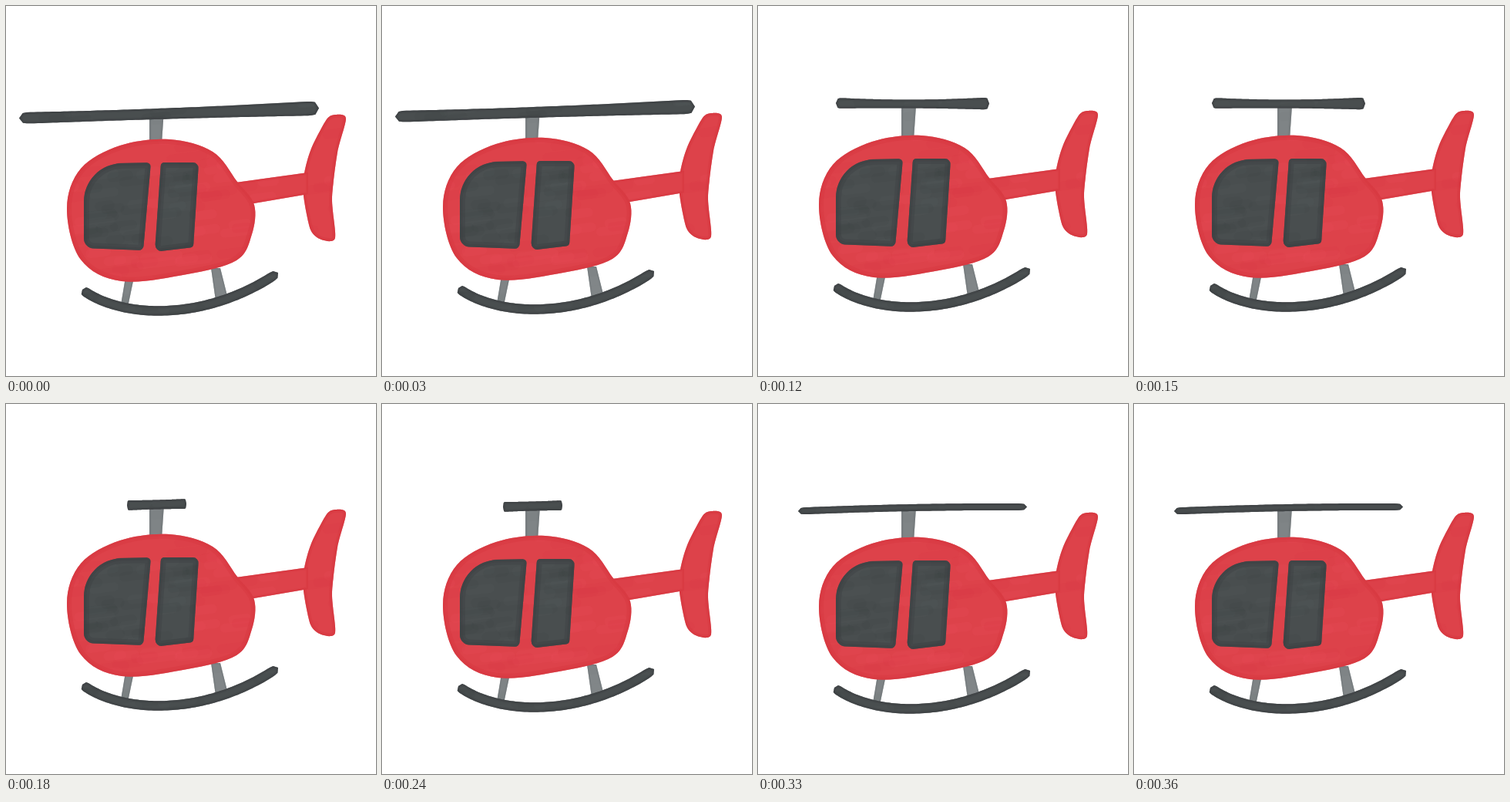
These frames come from a looping animation (480 by 480 pixels, 390 ms). An HTML page with a canvas:

```html
<!DOCTYPE html>
<html lang="en">
<head>
<meta charset="utf-8">
<title>Helicopter</title>
<style>
html, body { margin: 0; width: 100%; height: 100%; overflow: hidden; background: #fff; }
canvas { display: block; width: 480px; height: 480px; }
</style>
</head>
<body>
<canvas id="stage" width="480" height="480"></canvas>
<script>
const ctx = document.getElementById('stage').getContext('2d');

const STEP = 30;
const STEPS = 13;
const RISE_STEPS = 9;
const BLADE_ORDER = 'AABBCCDDDEEBB';

const RED = { fill: '#dd424a', edge: '#d4343e', dark: '#d0353f', light: '#e5525a' };
const DARK = { fill: '#494e4f', edge: '#393e3f', dark: '#3e4344', light: '#585e5e' };
const GRAY = { fill: '#7f8486', edge: '#717678', dark: '#74797c', light: '#8d9294' };

function random(seed) {
  return () => (seed = (seed * 16807) % 2147483647) / 2147483647;
}

// Closed curve through the given points.
function smooth(points, tension = 1 / 6) {
  const n = points.length;
  const at = i => points[(i + n) % n];
  const path = new Path2D();
  path.moveTo(...points[0]);
  for (let i = 0; i < n; i++) {
    const [a, b, c, d] = [at(i - 1), at(i), at(i + 1), at(i + 2)];
    const p = [0, 1].map(k => b[k] + (c[k] - a[k]) * tension);
    const q = [0, 1].map(k => c[k] - (d[k] - b[k]) * tension);
    path.bezierCurveTo(...p, ...q, ...c);
  }
  return path;
}

// Polygon of [x, y, corner radius].
function rounded(corners) {
  const [first, last] = [corners[0], corners[corners.length - 1]];
  const path = new Path2D();
  path.moveTo((first[0] + last[0]) / 2, (first[1] + last[1]) / 2);
  corners.forEach(([x, y, r = 0], i) => {
    const [nx, ny] = corners[(i + 1) % corners.length];
    path.arcTo(x, y, nx, ny, r);
  });
  path.closePath();
  return path;
}

// Band with rounded ends around centre(t), thickness(t) wide.
function ribbon(centre, thickness) {
  const upper = [], lower = [];
  for (let i = 0; i <= 80; i++) {
    const t = i / 80;
    const [x, y] = centre(t);
    const [ax, ay] = centre(t - 0.001), [bx, by] = centre(t + 0.001);
    const length = Math.hypot(bx - ax, by - ay);
    const cap = Math.sqrt(1 - Math.abs(2 * t - 1) ** 50);
    const half = thickness(t) / 2 * cap / length;
    upper.push([x + (by - ay) * half, y - (bx - ax) * half]);
    lower.unshift([x - (by - ay) * half, y + (bx - ax) * half]);
  }
  return rounded([...upper, ...lower]);
}

const cubic = (a, b, c, d) => t => [0, 1].map(k =>
  (1 - t) ** 3 * a[k] + 3 * t * (1 - t) ** 2 * b[k] + 3 * t * t * (1 - t) * c[k] + t ** 3 * d[k]);

// Parabola through start, middle and end values.
const bend = ([a, b, c]) => t =>
  a * (1 - t) * (1 - 2 * t) + b * 4 * t * (1 - t) + c * t * (2 * t - 1);

function blade(left, right, heights, widths) {
  const y = bend(heights);
  const path = ribbon(t => [left + (right - left) * t, y(t)], bend(widths));
  return { path, ink: DARK, rim: 3 };
}

// Felt-pen look: flat colour, broad faint strokes and a darker rim.
function marker({ path, ink, rim }, seed) {
  const rnd = random(seed);
  ctx.save();
  ctx.fillStyle = ink.fill;
  ctx.fill(path);
  ctx.clip(path);
  ctx.lineCap = 'round';
  ctx.lineWidth = 12;
  ctx.globalAlpha = 0.14;
  for (let i = 0; i < 180; i++) {
    const x = rnd() * 440, y = 120 + rnd() * 285, length = 12 + rnd() * 32;
    ctx.strokeStyle = rnd() < 0.5 ? ink.dark : ink.light;
    ctx.beginPath();
    ctx.moveTo(x, y);
    ctx.lineTo(x + length, y - length * 0.12);
    ctx.stroke();
  }
  ctx.globalAlpha = 0.35;
  ctx.strokeStyle = ink.edge;
  for (const width of [rim * 2, rim]) {
    ctx.lineWidth = width;
    ctx.stroke(path);
  }
  ctx.restore();
}

const mast = rounded([[186, 134], [205, 134], [202, 178], [186, 178]]);
const frontStrut = rounded([[155, 352], [166, 352], [158, 390], [149, 388]]);
const rearStrut = rounded([[266, 340], [278, 340], [288, 380], [272, 382]]);
const skid = ribbon(cubic([99, 368], [148, 405], [258, 411], [353, 346]), () => 12.5);
const boom = rounded([[298, 229], [392, 216], [392, 244], [310, 258]]);
const fin = smooth([
  [387, 217], [396, 185], [416, 147], [428, 141], [441, 146], [430, 190],
  [423, 250], [427, 301], [409, 303], [395, 290], [386, 246]
], 0.13);
const body = smooth([
  [79, 263], [97, 211], [148, 181], [212, 173], [268, 189], [300, 228],
  [322, 258], [319, 296], [299, 330], [235, 348], [150, 357], [97, 329]
]);
const frontWindow = rounded([[188, 203, 5], [178, 317, 6], [101, 314, 13], [101, 205, 50]]);
const rearWindow = rounded([[201, 203, 5], [250, 203, 7], [243, 313, 5], [193, 319, 8]]);

const parts = [
  { path: mast, ink: GRAY, rim: 3 },
  { path: frontStrut, ink: GRAY, rim: 2 },
  { path: rearStrut, ink: GRAY, rim: 2 },
  { path: skid, ink: DARK, rim: 3 },
  { path: fin, ink: RED, rim: 4 },
  { path: boom, ink: RED, rim: 3 },
  { path: body, ink: RED, rim: 6 },
  { path: frontWindow, ink: DARK, rim: 7 },
  { path: rearWindow, ink: DARK, rim: 7 }
];

const blades = {
  A: blade(17, 406, [145.5, 139.5, 132.5], [15, 14, 19]),
  B: blade(52, 349, [139, 134.5, 133.5], [9, 9, 9]),
  C: blade(101, 300, [131, 132, 131.5], [14, 11, 16]),
  D: blade(157, 234, [135.5, 134.5, 133.5], [13, 12, 13]),
  E: blade(113, 276, [137, 137.5, 138], [14, 13, 14])
};

function draw(now) {
  const step = Math.floor(now / STEP) % STEPS;
  const lift = step < RISE_STEPS ? Math.round(4.7 * Math.sin(Math.PI * step / RISE_STEPS)) : 0;
  ctx.fillStyle = '#fff';
  ctx.fillRect(0, 0, 480, 480);
  ctx.save();
  ctx.translate(0, -lift);
  [...parts, blades[BLADE_ORDER[step]]].forEach((part, i) => marker(part, 31 + i * 977));
  ctx.restore();
}

const start = performance.now();
function tick() {
  draw(performance.now() - start);
  requestAnimationFrame(tick);
}
tick();
</script>
</body>
</html>
```
